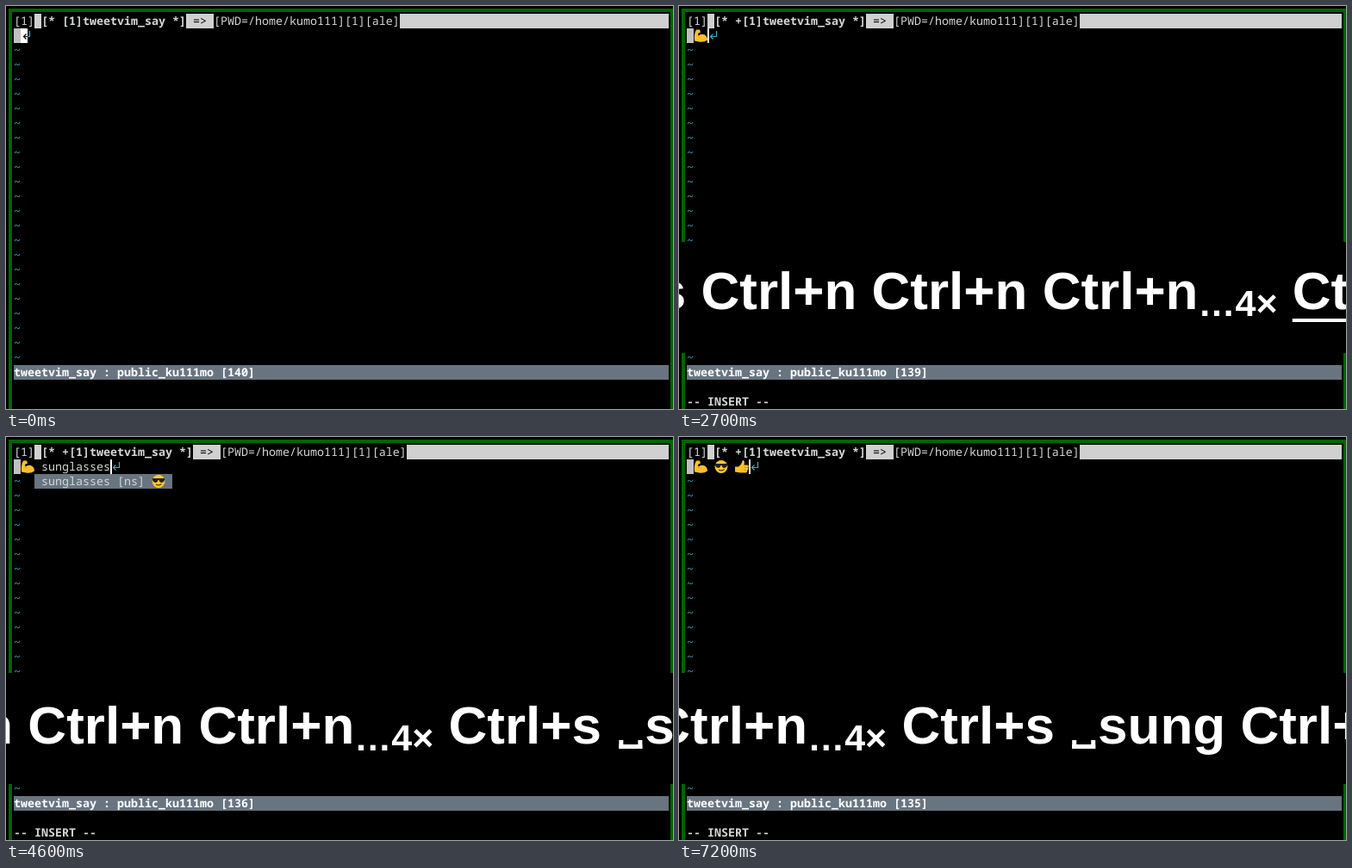
An HTML page that plays this animation: 774 by 468 pixels, repeating every 8 s.

```html
<!DOCTYPE html>
<html lang="en">
<head>
<meta charset="utf-8">
<style>
html, body { margin: 0; width: 774px; height: 468px; overflow: hidden; background: #000; }
#stage { position: relative; width: 774px; height: 468px; overflow: hidden; }
#frame { position: absolute; left: 3px; top: 3px; width: 764px; height: 480px; border: 4px solid #006400; }
.row {
  position: absolute; height: 17px; white-space: pre; color: #d3d7d7;
  font: 13.3333px/17px "Noto Sans Mono", monospace; text-rendering: geometricPrecision;
}
.row svg { display: inline-block; vertical-align: top; width: 16px; height: 17px; }
.bold, b { font-weight: 700; }
.tab { background: #d0d0d0; color: #000; width: 760px; }
.tab span, .tab b { display: inline-block; height: 17px; background: #000; color: #d3d7d7; }
.tilde { color: #46a0b4; }
.status { background: #68747f; color: #fff; width: 760px; }
.item { background: #1b252f; }
.item.on { background: #68747f; }
.box { position: absolute; height: 17px; }
#band { position: absolute; left: 0; top: 274px; width: 774px; height: 129px; background: #000; overflow: hidden; }
#keys {
  position: absolute; left: 385px; transform: translateX(-50%); white-space: pre; color: #fff;
  font: 700 62px/70px "Liberation Sans", Arial, sans-serif;
}
#keys u { text-decoration: underline 4px; text-underline-offset: 11px; text-decoration-skip-ink: none; }
#keys sub { font-size: 43px; line-height: 0; vertical-align: baseline; position: relative; top: 8px; }
#keys i {
  display: inline-block; box-sizing: border-box; width: 27px; height: 10px; margin: 0 3px;
  border: solid #fff; border-width: 0 5px 5px; vertical-align: -6px;
}
</style>
</head>
<body>
<div id="stage">
  <div id="frame"></div>
  <div id="term"></div>
  <div id="band"><div id="keys"></div></div>
</div>
<script>
const $ = id => document.getElementById(id);
const disc = (x, y, r, f) => `<circle cx="${x}" cy="${y}" r="${r}" fill="${f}"/>`;
const fill = (d, f) => `<path d="${d}" fill="${f}"/>`;
const line = (d, c, w = 1) => `<path d="${d}" fill="none" stroke="${c}" stroke-width="${w}"/>`;

const dark = '#4a3520', yellow = '#ffcb2f';
const face = disc(8, 8, 7.4, yellow);
const eyes = disc(5.5, 6, 1.1, dark) + disc(10.5, 6, 1.1, dark);
const smile = fill('M3.5 8.5H12.5Q12 13 8 13T3.5 8.5', dark);
const tongue = fill('M6 10H10.5V13Q8.2 15.5 6 13Z', '#f0506e');
const ears = disc(3.5, 4, 2.8, '#b9b9b9') + disc(12.5, 4, 2.8, '#b9b9b9');
const petals = (n, r, f) => Array.from({ length: n }, (_, i) => {
  const a = i * 2 * Math.PI / n;
  return disc(8 + 5.5 * Math.cos(a), 8 + 5.5 * Math.sin(a), r, f);
}).join('');

const emoji = {
  muscle: fill('M1 14Q0 7 3 1L7 1 8 4 5 5.5 5.5 8Q9 5 13 7 16 9 16 13 12 16 6 15Z', '#fbc02d') + line('M5.5 8.5L7 10', '#d58a12'),
  mushroom: fill('M5.5 8H10.5L11 15H5Z', '#f0e2cf') + fill('M1 9Q1 1 8 1T15 9Q8 11 1 9', '#e5483b') + disc(5, 5, 1.6, '#fff') + disc(11, 6, 1.6, '#fff'),
  musical_score: line('M0 4H16M0 7H16M0 10H16M0 13H16', '#4b555e') + line('M7 16V3Q9 0 9.5 3 4 8 5 11 8 14 10 10 8 7 6 11', '#20262b', 1.4),
  musical_keyboard: fill('M0 2H16V14H0Z', '#f2f2f2') + line('M4 2V14M8 2V14M12 2V14', '#777') + line('M4 2V9M8 2V9M12 2V9', '#111', 2),
  musical_note: line('M6 12V3L13 2V11', '#23a0e8', 2) + disc(4, 12, 2.6, '#23a0e8') + disc(11, 12, 2.6, '#23a0e8') + line('M6 4.5L13 3.5', '#23a0e8', 3),
  mouse2: disc(7, 10, 5, '#e4e4e4') + disc(4, 4, 2.5, '#cfcfcf') + disc(9, 4, 2.5, '#cfcfcf') + disc(6.5, 6, 3.2, '#eee') + line('M11 13Q15 12 14 8', '#ccc') + disc(5.5, 6, .7, dark) + disc(8, 6, .7, dark),
  minibus: fill('M0 11L3 4H16V12H0Z', '#dfe5e8') + fill('M2 9L4 5.5H15V9Z', '#5d7a8c') + disc(4, 12.5, 1.8, '#555') + disc(12, 12.5, 1.8, '#555'),
  mouse: ears + disc(8, 9, 6, '#ededed') + disc(5.7, 8, 1, dark) + disc(10.3, 8, 1, dark) + disc(8, 11, 1.2, '#e88a9a'),
  mountain_bicyclist: fill('M0 16L9 6 16 10V16Z', '#8c6e4a') + disc(5, 12, 3, '#46a0bd') + disc(12, 11, 3, '#46a0bd') + line('M5 10L8 6 11 10', '#f0b429', 2) + disc(8, 3, 2.2, '#5fb3c8'),
  sunny: '',
  sunflower: line('M8 8V16', '#4c9a3a', 2) + petals(10, 2, '#fbc02d') + disc(8, 8, 3.8, '#6d4a2a'),
  sunrise_over_mountains: fill('M0 0H16V16H0Z', '#3b6f4c') + disc(8, 8, 5, yellow) + line('M8 0V5M2 2L5 6M14 2L11 6', '#ffdf6b') + fill('M0 16V10L6 8 16 13V16Z', '#5ea83a'),
  sun_with_face: petals(8, 2.2, '#f9a825') + disc(8, 8, 5.5, yellow) + disc(6, 7, .9, dark) + disc(10, 7, .9, dark) + line('M5.5 10Q8 12 10.5 10', dark),
  sunglasses: face + fill('M1 4.5H15V6.5Q14 9.5 11 9.5 9 9 8.5 6.5H7.5Q7 9 5 9.5 2 9.5 1 6.5Z', '#222') + line('M5 11.5Q8 13.5 11.5 11', dark, 1.2),
  sunrise: fill('M0 1H16V15H0Z', '#f5a85c') + disc(8, 9, 5, '#ffd84a') + fill('M0 9H16V15H0Z', '#55b4dd') + line('M2 12H14', '#d9f1fa'),
  suspension_railway: fill('M2 3H14V14H2Z', '#e05a5a') + fill('M3.5 5.5H12.5V9.5H3.5Z', '#9ad1e6') + line('M0 1.5H16M8 1V4', '#8aa', 1.5) + disc(5, 12, 1, '#fff') + disc(11, 12, 1, '#fff'),
  small_blue_diamond: fill('M8 5L11 8 8 11 5 8Z', '#4d9be0'),
  stuck_out_tongue_winking_eye: face + disc(5, 6, 1.6, '#fff') + disc(5, 6, .9, dark) + line('M9 6L13 5.5', dark, 1.3) + smile + tongue,
  stuck_out_tongue: face + eyes + smile + tongue,
  sound: fill('M0 6H4L9 2V14L4 10H0Z', '#58a8de') + line('M11 5Q13 8 11 11M13 3Q17 8 13 13', '#e8ba36', 1.2),
  stuck_out_tongue_closed_eyes: face + line('M3 5L6.5 6.5 3 7.5M13 5L9.5 6.5 13 7.5', dark) + smile + tongue,
  '+1': fill('M0 8H4Q8 5 8.5 1 11 0 11 3L10.5 6H15Q16.5 8 15 9 16 11 14.5 12 14.5 14 13 15H6L0 14Z', '#fbc02d') + line('M10.5 9H15M10.5 12H14', '#d58a12', .8)
};
const icon = name => `<svg viewBox="0 -.5 16 17">${emoji[name]}</svg>`;

const names = Object.keys(emoji);
const musList = names.slice(1, 9);
musList.splice(3, 0, 'muscle');
const sunList = names.slice(9, 21);

// Each step changes only what differs from the one before.
const ctrlN = ' Ctrl+n', mus3 = 'imus' + ctrlN.repeat(3), mus4 = mus3 + '…4× Ctrl+s';
const sung = mus4 + ' ␣sung', sunDone = sung + ctrlN + ' Ctrl+s';
const steps = [
  [0, { text: '', cursor: 'block', left: 140, keys: '', mark: 0, list: null, pick: -1, insert: false }],
  [300, { cursor: '' }],
  [600, { cursor: 'bar', insert: true, keys: 'i', mark: 1 }],
  [800, { text: 'm', left: 139, mark: 0 }],
  [900, { keys: 'im', mark: 1 }],
  [1100, { text: 'mu', left: 138, mark: 0 }],
  [1200, { keys: 'imu', mark: 1 }],
  [1300, { text: 'mus', mark: 0 }],
  [1400, { keys: 'imus', mark: 1 }],
  [1500, { list: musList, mark: 0 }],
  [1800, { text: 'mushroom', pick: 0, keys: 'imus' + ctrlN, mark: 6 }],
  [2000, { text: 'musical_score', pick: 1, mark: 0 }],
  [2100, { keys: 'imus' + ctrlN.repeat(2), mark: 6 }],
  [2300, { text: 'musical_keyboard', pick: 2, keys: mus3 }],
  [2400, { text: 'muscle', pick: 3, keys: mus3 + '…4×', mark: 0 }],
  [2700, { text: ':muscle:', list: null, pick: -1, left: 139, keys: mus4, mark: 6 }],
  [2900, { mark: 0 }],
  [3300, { keys: mus4 + ' ␣' }],
  [3400, { text: ':muscle: ' }],
  [3800, { text: ':muscle: s', left: 137, keys: mus4 + ' ␣s' }],
  [3900, { text: ':muscle: su', left: 136, keys: mus4 + ' ␣su' }],
  [4000, { text: ':muscle: sun', list: sunList, keys: mus4 + ' ␣sun' }],
  [4100, { text: ':muscle: sung', list: ['sunglasses'] }],
  [4200, { keys: sung }],
  [4600, { text: ':muscle: sunglasses', pick: 0, keys: sung + ctrlN }],
  [4800, { list: null, pick: -1, insert: false, keys: sunDone }],
  [4900, { text: ':muscle: :sunglasses:', left: 137, insert: true }],
  [5500, { cursor: '', keys: sunDone + ' ␣' }],
  [6200, { text: ':muscle: :sunglasses: ', cursor: 'bar' }],
  [6400, { text: ':muscle: :sunglasses: +', left: 135 }],
  [6500, { keys: sunDone + ' ␣+' }],
  [6700, { text: ':muscle: :sunglasses: +1', left: 134, keys: sunDone + ' ␣+1' }],
  [7200, { text: ':muscle: :sunglasses: :+1:', left: 135, keys: sunDone + ' ␣+1 Ctrl+s' }]
];
const LOOP = 8000, CODE = /:([\w+]+):/g;
const states = [];
steps.forEach(([at, change], i) => states.push({ ...states[i - 1], ...change, at }));

const row = (n, html, cls = '', x = 9) =>
  `<div class="row ${cls}" style="left:${x}px;top:${9 + 17 * n}px">${html}</div>`;
const box = (x, w, color) =>
  `<div class="box" style="left:${x}px;top:26px;width:${w}px;background:${color}"></div>`;
const eol = (x, color, clip) =>
  `<svg class="box" style="left:${x}px;top:26px" width="${clip || 14}" height="17">${line('M10.5 3V9.5H3.5M6.5 6.5L3.5 9.5 6.5 12.5', color, 1.2)}</svg>`;

function popup(s, x) {
  const width = Math.max(...s.list.map(n => n.length));
  return s.list.map((n, i) => row(i + 2,
    ` ${n.padEnd(width)} [ns] ${icon(n)} `, i === s.pick ? 'item on' : 'item', x)).join('');
}

function draw(s) {
  const plus = s.left < 140 ? '+' : '';
  const end = 17 + 8 * s.text.replace(CODE, '##').length;
  let html = row(0, `<span>[1]</span> <b>[* ${plus}[1]tweetvim_say *]</b> =&gt; <span>[PWD=/home/kumo111][1][ale]</span>`, 'tab');
  for (let n = 2; n < 24; n++) html += row(n, '~', 'tilde');
  html += box(9, 8, '#c0c0c0') + row(1, s.text.replace(CODE, (_, n) => icon(n)), '', 17) + eol(end, '#4aa5c8');
  if (s.cursor === 'block') html += box(end, 8, '#fff') + eol(end, '#000', 8);
  if (s.cursor === 'bar') html += box(end, 2, '#fff');
  if (s.list) html += popup(s, s.text.startsWith(':') ? 33 : 9);
  html += row(24, `tweetvim_say : public_ku111mo [${s.left}]`, 'status bold');
  if (s.insert) html += row(26, '-- INSERT --', 'bold');
  $('term').innerHTML = html;

  const cut = s.keys.length - s.mark;
  const marked = s.mark ? `<u>${s.keys.slice(cut)}</u>` : '';
  $('band').style.display = s.keys ? '' : 'none';
  $('keys').style.top = (s.keys.includes('␣') ? 26 : 22) + 'px';
  $('keys').innerHTML = (s.keys.slice(0, cut) + marked + ' ')
    .replace(/␣/g, '<i></i>').replace('…4×', '<sub>…4×</sub>');
}

let shown;
const start = performance.now();
function tick() {
  const t = (performance.now() - start) % LOOP;
  const s = states.findLast(x => x.at <= t);
  if (s !== shown) draw(shown = s);
  requestAnimationFrame(tick);
}
tick();
</script>
</body>
</html>
```
